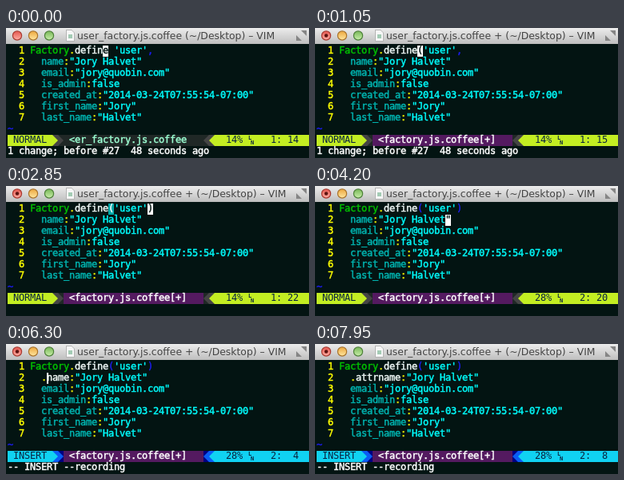
An HTML page with a canvas that plays this animation: 379x163 px, repeating every 8000 ms.

```html
<!DOCTYPE html>
<html lang="en">
<head>
<meta charset="utf-8">
<title>Vim session</title>
<style>
  html, body { margin: 0; width: 100%; height: 100%; overflow: hidden; background: #031412; }
  canvas { display: block; width: 379px; height: 163px; }
</style>
</head>
<body>
<canvas id="stage"></canvas>
<script>
const W = 379, H = 163, LOOP = 8000;
const CELL = 7, ROW = 14, LEFT = 2, TOP = 22, GUTTER = 4, BAR = 20;
const STATUS = 8, COMMAND = 9;
const MONO = '12px "DejaVu Sans Mono", monospace';
const SANS = '12.4px "DejaVu Sans", sans-serif';

const C = {
  bg: '#031412', num: '#ffff00', name: '#00c000', text: '#f0f8f6', key: '#00b4b0',
  str: '#00fbfb', op: '#e6e600', punct: '#1c1cf0', tilde: '#1c1cf0', match: '#00a8a8',
  white: '#ffffff', ink: '#0a2440', dirty: '#541a60'
};
const MODES = {
  NORMAL: { a: '#c3ee22', b: '#444444', c: '#202826' },
  INSERT: { a: '#10d2f2', b: '#0a5cf5', c: '#000080' }
};

// Each step overrides the state from its time (ms) on; row and col are 0-based.
const STEPS = [
  [0, { mode: 'NORMAL', row: 0, col: 13, on: true, open: ' ', close: ',', prop: 'name',
        dirty: false, match: false, msg: '1 change; before #27  48 seconds ago' }],
  [150, { on: false }],
  [450, { on: true, col: 14 }],
  [750, { on: false }],
  [1050, { on: true, open: '(', dirty: true }],
  [1800, { mode: 'INSERT', col: 22, msg: '-- INSERT --' }],
  [2100, { col: 21, close: '' }],
  [2400, { col: 22, close: ')', match: true }],
  [2850, { mode: 'NORMAL', col: 21, msg: '' }],
  [3300, { row: 1, col: 19, match: false }],
  [3900, { on: false }],
  [4200, { on: true }],
  [4350, { msg: 'recording' }],
  [5100, { on: false }],
  [5400, { on: true }],
  [5550, { mode: 'INSERT', col: 2, msg: '-- INSERT --recording' }],
  [6300, { col: 3, prop: '.name' }],
  [6450, { col: 4, prop: '.aname' }],
  [6750, { col: 5, prop: '.atname' }],
  [7050, { col: 6, prop: '.attname' }],
  [7200, { col: 7, prop: '.attrname' }],
  [7950, { on: false }]
];

const FIELDS = [
  ['email', '"jory@quobin.com"'],
  ['is_admin', 'false'],
  ['created_at', '"2014-03-24T07:55:54-07:00"'],
  ['first_name', '"Jory"'],
  ['last_name', '"Halvet"']
];

const canvas = document.getElementById('stage');
const ctx = canvas.getContext('2d');
const ratio = window.devicePixelRatio || 1;
canvas.width = W * ratio;
canvas.height = H * ratio;
ctx.scale(ratio, ratio);
ctx.lineJoin = 'round';

const cellX = c => LEFT + c * CELL;
const rowY = r => TOP + r * ROW;

function rect(x, y, w, h, fill) {
  ctx.fillStyle = fill;
  ctx.fillRect(x, y, w, h);
}

function shape(points, fill) {
  ctx.fillStyle = fill;
  ctx.beginPath();
  points.forEach(([x, y]) => ctx.lineTo(x, y));
  ctx.fill();
}

function fade(y0, y1, from, to) {
  const g = ctx.createLinearGradient(0, y0, 0, y1);
  g.addColorStop(0, from);
  g.addColorStop(1, to);
  return g;
}

// Writes on the character grid and returns the next free cell.
// Light text gets a thin outline, which makes it slightly heavier.
function put(c, r, text, color, covered = -1) {
  ctx.font = MONO;
  ctx.lineWidth = 0.45;
  for (const ch of text) {
    const x = cellX(c), y = rowY(r) + 10;
    ctx.fillStyle = ctx.strokeStyle = c === covered ? C.bg : color;
    ctx.fillText(ch, x, y);
    if (color !== C.ink) ctx.strokeText(ch, x, y);
    c++;
  }
  return c;
}

function light(x, edge, top, bottom) {
  ctx.beginPath();
  ctx.arc(x, 9.5, 5.6, 0, 7);
  ctx.fillStyle = fade(4, 15, top, bottom);
  ctx.fill();
  ctx.lineWidth = 1.2;
  ctx.strokeStyle = edge;
  ctx.stroke();
}

function drawTitle(s) {
  rect(0, 0, W, BAR, fade(0, BAR, '#ececec', '#bebebe'));
  light(14, '#a8382f', '#e4574f', '#ffaea4');
  light(34, '#a8722a', '#eda83e', '#ffe7a0');
  light(54, '#4c7f38', '#79b858', '#c8eeaa');
  if (s.dirty) {
    ctx.fillStyle = '#5c1410';
    ctx.beginPath();
    ctx.arc(14, 9.5, 2.2, 0, 7);
    ctx.fill();
  }
  shape([[75, 2], [82, 2], [86, 6], [86, 17], [75, 17]], '#b4b4b4');
  shape([[76, 3], [82, 3], [85, 6], [85, 16], [76, 16]], '#f6f6f6');
  rect(78, 8, 5, 5, '#a3cbb4');
  ctx.font = SANS;
  ctx.fillStyle = '#444444';
  ctx.fillText(`user_factory.js.coffee ${s.dirty ? '+ ' : ''}(~/Desktop) – VIM`, 89, 14);
  shape([[376, 3], [376, 10], [369, 3]], '#858585');
  shape([[363, 16], [363, 9], [370, 16]], '#858585');
}

function drawCode(s) {
  const at = GUTTER + s.col;
  const block = s.on && s.mode === 'NORMAL';
  if (s.match) rect(cellX(GUTTER + 14), rowY(0), CELL, ROW, C.match);
  if (s.match && s.mode === 'INSERT') rect(cellX(GUTTER + 21), rowY(0), CELL, ROW, C.match);
  if (block) rect(cellX(at), rowY(s.row), CELL, ROW, C.white);

  const line = (r, runs) => {
    put(2, r, String(r + 1), C.num);
    let c = GUTTER;
    for (const [text, color] of runs) c = put(c, r, text, color, block && r === s.row ? at : -1);
  };
  const dotted = name => [['.', C.op], [name, C.text]];
  const field = (key, value) => [
    ['  ', C.text],
    ...(key[0] === '.' ? dotted(key.slice(1)) : [[key, C.key]]),
    [':', C.op], [value, C.str]
  ];
  const paren = s.match ? C.white : C.punct;
  line(0, [['Factory', C.name], ...dotted('define'), [s.open, paren], ["'user'", C.str], [s.close, paren]]);
  [[s.prop, '"Jory Halvet"'], ...FIELDS].forEach(([key, value], i) => line(i + 1, field(key, value)));
  put(0, 7, '~', C.tilde);

  if (s.on && !block) rect(cellX(at), rowY(s.row), 2, ROW, C.white);
}

function drawStatus(s) {
  const { a, b, c } = MODES[s.mode];
  const y = rowY(STATUS);
  const bar = (from, to, fill) => rect(cellX(from), y, (to - from) * CELL, ROW, fill);
  const arrow = (base, tip, fill) =>
    shape([[cellX(base), y], [cellX(tip), y + ROW / 2], [cellX(base), y + ROW]], fill);

  bar(0, 8, a);
  bar(8, 9, b);
  bar(9, 36, c);
  if (s.dirty) bar(10, 35, C.dirty);
  bar(36, 37, b);
  bar(37, 54, a);
  arrow(8, 9, a);
  arrow(9, 10, b);
  arrow(36, 35, b);
  arrow(37, 36, a);

  put(1, STATUS, s.mode, C.ink);
  put(11, STATUS, s.dirty ? '<factory.js.coffee[+]' : '<er_factory.js.coffee', s.dirty ? C.white : '#9cffd3');
  put(39, STATUS, Math.floor((s.row + 1) * 100 / 7) + '%', C.ink);
  put(47, STATUS, `${s.row + 1}:${String(s.col + 1).padStart(3)}`, C.ink);
  ctx.font = 'bold 7px "DejaVu Sans Mono", monospace';
  ctx.fillText('L', cellX(43), y + 6);
  ctx.fillText('N', cellX(43) + 3, y + 12);
}

function stateAt(t) {
  return Object.assign({}, ...STEPS.filter(([start]) => start <= t).map(([, change]) => change));
}

function frame() {
  const s = stateAt(performance.now() % LOOP);
  rect(0, 0, W, H, C.bg);
  drawTitle(s);
  drawCode(s);
  drawStatus(s);
  put(0, COMMAND, s.msg, C.white);
  requestAnimationFrame(frame);
}
frame();
</script>
</body>
</html>
```
